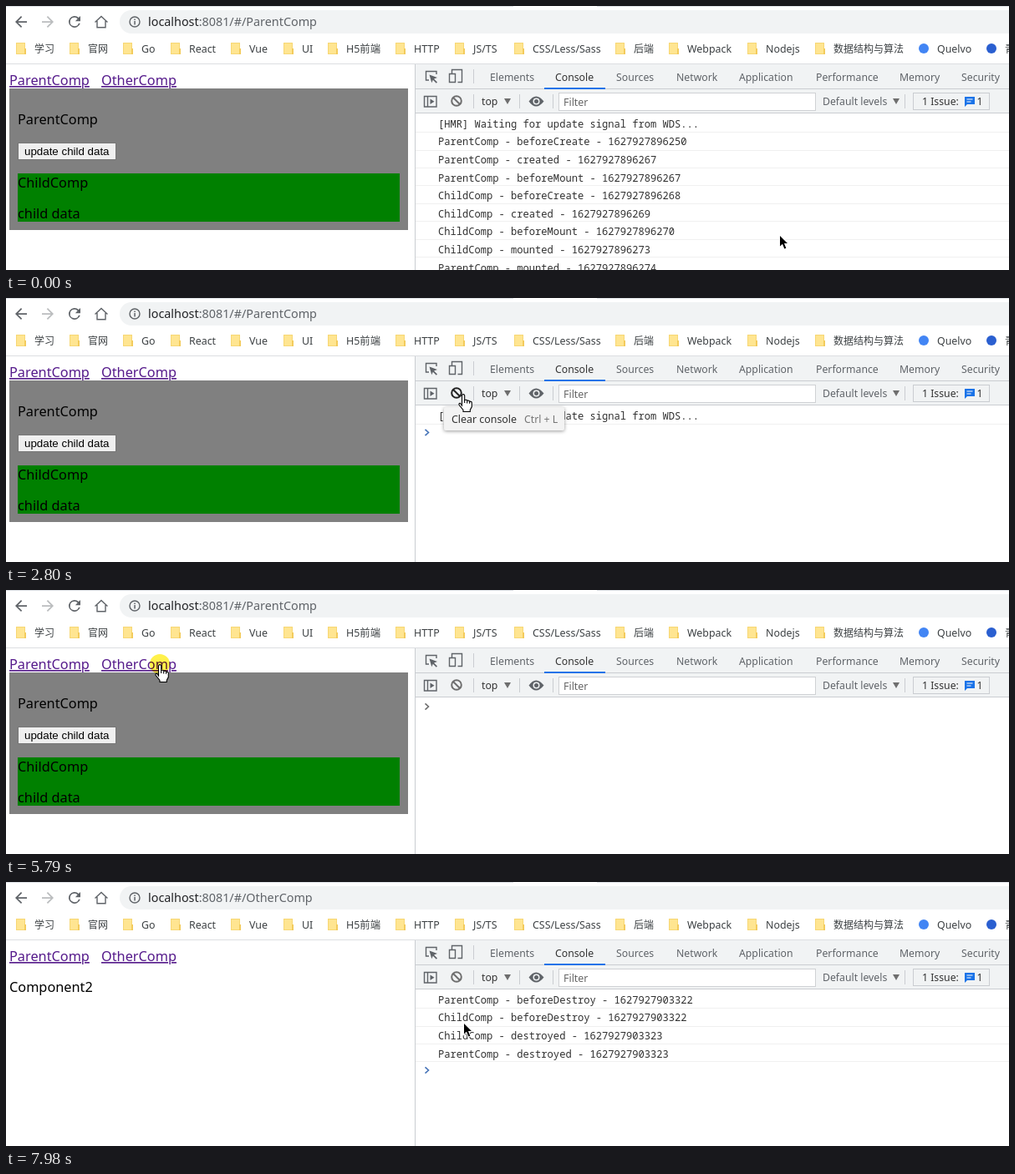
Animation of 1200x317 px, one loop 8 s. Source, as an HTML page:

```html
<!DOCTYPE html>
<html lang="zh">
<head>
<meta charset="utf-8">
<title>Component lifecycle</title>
<style>
html, body { margin: 0; width: 100%; height: 100%; overflow: hidden; background: #fff; }
svg { display: block; font: 12.25px "Noto Sans", "Noto Sans CJK SC", "Noto Sans CJK", sans-serif; fill: #5f6368; }
text { white-space: pre; }
.page { font-size: 16.3px; fill: #000; }
.link { fill: #551a8b; text-decoration: underline 1px; }
.mono { font: 12.1px "Noto Sans Mono", monospace; fill: #303030; }
.button { font: 13.333px "Liberation Sans", Arial, sans-serif; fill: #000; }
.dark { fill: #333; }
.line { fill: none; stroke: #5f6368; stroke-width: 1.4; }
</style>
</head>
<body>
<svg id="stage" width="1200" height="317" viewBox="0 0 1200 317"></svg>
<script>
const LOOP = 8000, STEP = 70;
const stage = document.getElementById('stage');

// Markup helpers
const rect = (x, y, w, h, fill, more = '') =>
  `<rect x="${x}" y="${y}" width="${w}" height="${h}" fill="${fill}" ${more}/>`;
const text = (x, y, s, more = '') => `<text x="${x}" y="${y}" ${more}>${s}</text>`;
const icon = (cx, cy, d, more = '') =>
  `<path transform="translate(${cx} ${cy}) scale(.875) translate(-12 -12)" d="${d}" ${more}/>`;
const line = (d, more = '') => `<path class="line" d="${d}" ${more}/>`;
const dot = (x, y, r, fill, more = '') => `<circle cx="${x}" cy="${y}" r="${r}" fill="${fill}" ${more}/>`;
const framed = (x, y, w, h, fill, stroke) => rect(x + .5, y + .5, w - 1, h - 1, fill, `stroke="${stroke}"`);
const triangle = x => `<path d="M${x} 111h8l-4 7z" fill="#6e6e6e"/>`;

const BACK = 'M20 11H7.8l5.6-5.6L12 4l-8 8 8 8 1.4-1.4L7.8 13H20z';
const FORWARD = 'M4 11h12.2l-5.6-5.6L12 4l8 8-8 8-1.4-1.4 5.6-5.6H4z';
const RELOAD = 'M17.65 6.35A8 8 0 1 0 19.73 14h-2.08A6 6 0 1 1 12 6c1.66 0 3.14.69 4.22 1.78L13 11h7V4z';
const STOP = 'M19 6.4 17.6 5 12 10.6 6.4 5 5 6.4l5.6 5.6L5 17.6 6.4 19l5.6-5.6 5.6 5.6 1.4-1.4-5.6-5.6z';

const bookmarks = [
  [34, '学习'], [98, '官网'], [162, 'Go'], [219, 'React'], [291, 'Vue'], [354, 'UI'], [407, 'H5前端'],
  [488, 'HTTP'], [559, 'JS/TS'], [630, 'CSS/Less/Sass'], [751, '后端'], [815, 'Webpack'],
  [909, 'Nodejs'], [990, '数据结构与算法'], [1114, 'Quelvo', '#4285f4'], [1195, '青', '#2a5fd0']
];
const tabs = [
  [579, 'Elements'], [657, 'Console'], [730, 'Sources'], [802, 'Network'], [877, 'Application'],
  [969, 'Performance'], [1069, 'Memory'], [1143, 'Security']
];

function bookmark([x, name, color]) {
  const size = name.charCodeAt(0) > 255 ? 12 : 12.4;
  const mark = color ? dot(x - 16, 51, 6, color)
    : framed(x - 22, 44, 11, 14, '#ffe591', '#f7d774') + rect(x - 12, 51, 2, 7, '#f3cb5c');
  return mark + text(x, 56, name, `font-size="${size}" fill="#3c4043"`);
}

const browser =
  rect(0, 0, 607, 1, '#dee1e6') + rect(707, 0, 493, 1, '#dee1e6') +
  rect(136, 5, 1100, 28, '#f1f3f4', 'rx="14"') +
  dot(82, 19, 14, '#eceef0', 'id="hover"') +
  icon(18, 19, BACK) + icon(50, 19, FORWARD, 'fill="#babcbe"') + icon(82, 19, RELOAD, 'id="reload"') +
  line('M106.5 19.5 114 12.5l7.5 7M109 18v7.7h10V18', 'stroke-width="1.8"') +
  dot(154, 19, 6, 'none', 'stroke="#5f6368" stroke-width="1.4"') +
  rect(153.3, 18, 1.5, 4.5, '#5f6368') + rect(153.3, 15.5, 1.5, 1.5, '#5f6368') +
  `<text x="170" y="24" font-size="14.36"><tspan fill="#202124">localhost</tspan>:8081/#/<tspan id="route"></tspan></text>` +
  bookmarks.map(bookmark).join('') +
  rect(0, 69, 1200, 1, '#dcdee1');

const page =
  `<g class="page">` +
  text(4, 95, 'ParentComp', 'class="link"') + text(114, 95, 'OtherComp', 'class="link"') +
  `<g id="parent">` +
  rect(4, 99, 477, 170, '#808080') + rect(14, 201, 457, 58, '#008000') +
  text(14, 142, 'ParentComp') + text(14, 218, 'ChildComp') + text(14, 255, 'child data') +
  framed(14, 164, 118, 21, '#efefef', '#767676') + text(22, 179, 'update child data', 'class="button"') +
  `</g>` + text(4, 132, 'Component2', 'id="other"') + `</g>`;

const devtools =
  rect(490, 70, 710, 59, '#f1f3f4') + rect(489, 70, 1, 247, '#cacdd1') +
  rect(490, 99, 710, 1, '#cacdd1') + rect(490, 128, 710, 1, '#cacdd1') +
  rect(644, 98, 73, 2, '#1a73e8') +
  tabs.map(([x, s]) => text(x, 90, s, s == 'Console' ? 'class="dark"' : '')).join('') +
  [[559, 76], [559, 106], [614, 106], [654, 106], [1075, 106]].map(([x, y]) => rect(x, y, 1, 17, '#cacdd1')).join('') +
  line('M506 89h-3.5V78.5H515V82') + '<path d="M506.5 82.5l9.5 3.5-4 1.5 4 4-1.2 1.2-4-4-1.5 3.5z"/>' +
  line('M533.5 81v-4.5h12v15h-5M530.5 81.5h7v10h-7z') +
  line('M500.5 108.5h14.5v12.5h-14.5zM504.5 108.5V121') + '<path d="M507.5 111.5l5 3.2-5 3.2z"/>' +
  `<g id="clear" fill="none" stroke-width="2">${dot(539, 114, 5.8, 'none')}<path d="M535 110l8 8"/></g>` +
  text(569, 119, 'top', 'class="dark"') + triangle(596) +
  '<path d="M625.5 114.5q8.5-12 18 0-9.5 12-18 0z"/>' +
  dot(634.5, 114.5, 4, '#f1f3f4') + dot(634.5, 114.5, 2.5, '#5f6368') +
  framed(661, 104, 308, 22, '#fff', '#cfd1d4') + text(667, 120, 'Filter', 'font-size="12.4" fill="#666"') +
  text(977, 119, 'Default levels') + triangle(1061) +
  `<g id="issues"></g><g id="console"></g>` +
  `<g id="tip"><g style="filter:drop-shadow(0 1px 2px #0006)">${rect(524, 131, 144, 28, '#f3f3f3', 'rx="2"')}</g>` +
  text(533, 150, 'Clear console', 'class="dark" font-size="12.4"') + text(620, 150, 'Ctrl + L', 'fill="#757575"') + `</g>`;

const pointer =
  dot(0, 0, 12, '#ffee1e', 'id="click" style="mix-blend-mode:multiply" opacity=".8"') +
  `<path id="arrow" d="M1 2v12.5l3-2.7 2.3 5.7 2-.8-2.3-5.6h4z" fill="#000" stroke="#fff" stroke-width="2" paint-order="stroke"/>` +
  `<g id="hand" transform="translate(-6 0)" stroke="#000" stroke-width="1.1">` +
  `<path fill="#fff" d="M4.5 14V2.2a1.6 1.6 0 0 1 3.2 0v5.3q2.8-.8 3 .8 2.6-.6 2.9.8 2.7-.2 2.7 1.9v4.5l-2 4v2H6v-2L1.2 13.5q-.8-2.3 1.2-2.3z"/>` +
  `<path d="M7.7 7.5V11M10.7 8.5v3M13.6 9.3v2.5"/></g>`;

stage.innerHTML = browser + page + devtools + `<g id="pointer">${pointer}</g>`;
const el = {};
stage.querySelectorAll('[id]').forEach(e => el[e.id] = e);

// Console logs
const HMR = '[HMR] Waiting for update signal from WDS...';
const log = base => ([name, hook, ms]) => `${name}Comp - ${hook} - ${base + ms}`;
const boot = base => [HMR, ...[
  ['Parent', 'beforeCreate', 0], ['Parent', 'created', 17], ['Parent', 'beforeMount', 17],
  ['Child', 'beforeCreate', 18], ['Child', 'created', 19], ['Child', 'beforeMount', 20],
  ['Child', 'mounted', 23], ['Parent', 'mounted', 24]
].map(log(base))];
const teardown = [
  ['Parent', 'beforeDestroy', 0], ['Child', 'beforeDestroy', 0],
  ['Child', 'destroyed', 1], ['Parent', 'destroyed', 1]
].map(log(1627927903322));

// Timelines: [time, value], each value holds until the next
const logs = [[0, boot(1627927896250)], [930, []], [2460, [HMR]], [3150, boot(1627927900472)], [3220, []], [5920, teardown]];
const tips = [[0, 0], [590, .5], [660, 1], [930, .1], [1000, 0], [2530, .5], [2600, 1], [3220, .1], [3270, 0]];
const clicks = [[860, 930], [1890, 2030], [3150, 3220], [5790, 5920]];
// Pointer moves: start, steps, x, y
const moves = [
  [70, 7, 547, 115], [1200, 10, 72, 20], [2030, 6, 547, 115], [3600, 8, 78, 84], [4360, 4, 193, 102],
  [4640, 4, 184, 89], [6250, 7, 1094, 300], [6740, 5, 817, 242], [7770, 4, 547, 168]
];

const valueAt = (list, t) => list.filter(([at]) => at <= t).pop()[1];
const within = (v, a, b) => v >= a && v < b;
const show = (e, on) => e.style.display = on ? '' : 'none';

function pointerAt(t) {
  let x = 925, y = 274;
  for (const [start, steps, toX, toY] of moves) {
    if (t < start) break;
    const p = Math.min(1, (Math.floor((t - start) / STEP) + 1) / steps);
    const e = p * p * (3 - 2 * p);
    x += (toX - x) * e;
    y += (toY - y) * e;
  }
  return [x, y];
}

function consoleRows(rows) {
  const mid = 140 + rows.length * 21.5;
  return rows.map((s, i) =>
    text(517, Math.floor(146.2 + i * 21.6), s, 'class="mono"') +
    rect(490, Math.floor(151.6 + i * 21.4), 710, 1, '#f0f0f0')).join('') +
    `<path d="M501.5 ${mid - 3.7}l4 3.7-4 3.7" fill="none" stroke="${rows.length ? '#4674b8' : '#6e6e6e'}" stroke-width="1.6"/>`;
}

function issueButton(none) {
  const bubble = (x, fill) => `<path d="M${x} 109h12v9h-9l-3 3z" fill="${fill}"/>` +
    `<path d="M${x + 2.5} 112h7m-7 3h5" stroke="#fff"/>`;
  return framed(1085, 104, none ? 102 : 92, 21, '#f1f3f4', '#cacdd1') + (none
    ? text(1096, 119, 'No Issues', 'class="dark"') + bubble(1161, '#9aa0a6')
    : text(1096, 119, '1 Issue:', 'class="dark"') + bubble(1147, '#1a73e8') + text(1161.5, 119, '1', 'class="dark"'));
}

let shownRows, shownIssue;
function draw(t) {
  const [x, y] = pointerAt(t);
  const onClear = within(x, 526, 553) && within(y, 101, 128);
  const onLink = within(y, 80, 99) && (within(x, 4, 100) || within(x, 114, 205));
  el.pointer.setAttribute('transform', `translate(${Math.round(x)} ${Math.round(y)})`);
  show(el.hand, onClear || onLink);
  show(el.arrow, !onClear && !onLink);
  show(el.click, clicks.some(([a, b]) => within(t, a, b)));
  show(el.hover, Math.hypot(x - 82, y - 19) < 15);
  el.clear.setAttribute('stroke', onClear ? '#222' : '#6e6e6e');
  el.reload.setAttribute('d', within(t, 2030, 2800) ? STOP : RELOAD);
  el.tip.style.opacity = valueAt(tips, t);

  const left = t >= 5920;
  show(el.parent, !left);
  show(el.other, left);
  el.route.textContent = left ? 'OtherComp' : 'ParentComp';

  const rows = valueAt(logs, t), noIssue = within(t, 2030, 2320);
  if (rows !== shownRows) el.console.innerHTML = consoleRows(shownRows = rows);
  if (noIssue !== shownIssue) el.issues.innerHTML = issueButton(shownIssue = noIssue);
}

const begin = performance.now();
function tick() {
  draw((performance.now() - begin) % LOOP);
  requestAnimationFrame(tick);
}
tick();
</script>
</body>
</html>
```
